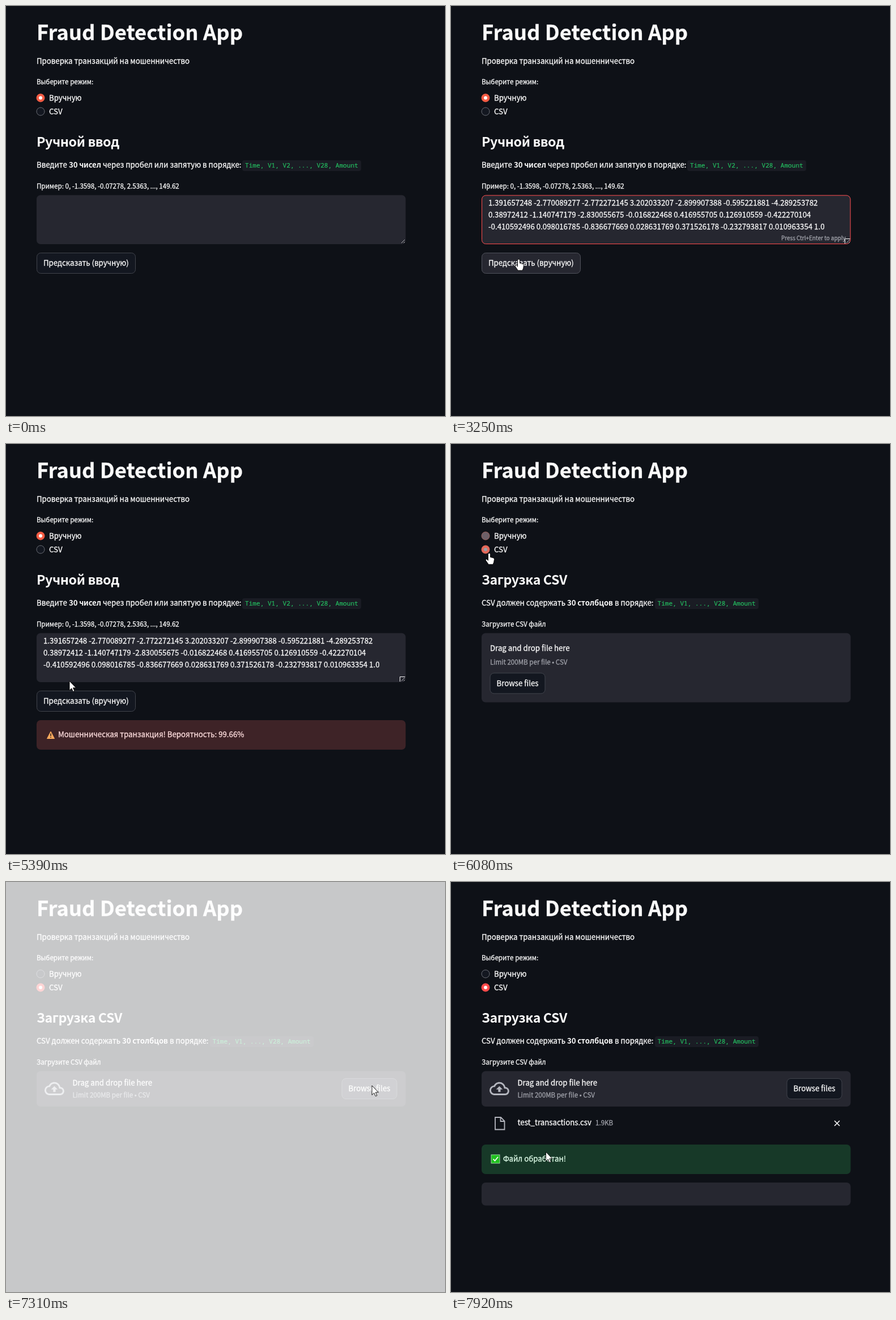
An HTML page for the animation above (7990 ms loop, 775 by 723 pixels).

```html
<!DOCTYPE html>
<html lang="ru">
<head>
<meta charset="utf-8">
<title>Fraud Detection App</title>
<style>
html, body { margin: 0; width: 100%; height: 100%; overflow: hidden; background: #0e1117; }
svg { display: block; width: 775px; height: 723px; }
text { --ink: #fafafa; font: 13.26px "Noto Sans CJK JP", "Noto Sans CJK SC", "Noto Sans CJK", "Open Sans", sans-serif; fill: var(--ink); stroke: var(--ink); stroke-width: .3; white-space: pre; }
.h1 { font-size: 36.45px; font-weight: 700; }
.h3 { font-size: 23.2px; font-weight: 600; letter-spacing: -.017em; stroke: none; }
.small { font-size: 11.6px; }
.tiny { font-size: 9.94px; }
.dim { --ink: #a0a2aa; }
.bold { font-weight: 600; letter-spacing: -.012em; stroke: none; }
.code { --ink: #25c262; font: 11.1px "Noto Sans Mono", "DejaVu Sans Mono", monospace; stroke-width: .15; }
.fraud { --ink: #ffdede; }
.ok { --ink: #dffde9; }
.tag { fill: #1a1c24; }
.box { fill: #262730; }
.btn { fill: #131720; stroke: #41444c; }
.btn.hover { fill: #262730; stroke: #50525b; }
#browse .btn.hover { fill: #383a44; stroke: #5c5e67; }
.line { fill: none; stroke: #fafafa; }
#cursor path { fill: #fff; stroke: #000; stroke-width: .9; }
#cursor #beam { fill: none; stroke: #e8e8e8; stroke-width: 1; }
</style>
</head>
<body>
<svg viewBox="0 0 775 723">
  <rect width="775" height="723" fill="#0e1117"/>
  <text class="h1" x="54" y="60">Fraud Detection App</text>
  <text x="54" y="102">Проверка транзакций на мошенничество</text>
  <text class="small" x="54" y="138">Выберите режим:</text>
  <g id="radio1"><circle cx="61" cy="162" r="7"/><circle cx="61" cy="162" r="3"/></g>
  <g id="radio2"><circle cx="61" cy="186" r="7"/><circle cx="61" cy="186" r="3"/></g>
  <text x="76" y="167">Вручную</text>
  <text x="76" y="191">CSV</text>

  <g id="manual">
    <text class="h3" x="54" y="248">Ручной ввод</text>
    <text y="285"><tspan x="54">Введите</tspan><tspan x="111" class="bold">30 чисел</tspan><tspan x="171">через пробел или запятую в порядке:</tspan></text>
    <rect class="tag" x="417" y="272" width="210" height="19" rx="4"/>
    <text class="code" x="422" y="285">Time, V1, V2, ..., V28, Amount</text>
    <text class="small" x="54" y="322">Пример: 0, -1.3598, -0.07278, 2.5363, ..., 149.62</text>
    <rect class="box" x="54" y="333.5" width="651.5" height="86.5" rx="7"/>
    <rect id="focus" x="54.5" y="334" width="650.5" height="85.5" rx="7" fill="none" stroke="#ff4b4b"/>
    <path class="line" d="M698 418l6-6M702 418l2-2" stroke-opacity=".75" stroke-width=".9"/>
    <path id="caret" class="line" d="M66.5 339v16"/>
    <g id="pasted">
      <text x="66" y="352">1.391657248 -2.770089277 -2.772272145 3.202033207 -2.899907388 -0.595221881 -4.289253782</text>
      <text x="66" y="373">0.38972412 -1.140747179 -2.830055675 -0.016822468 0.416955705 0.126910559 -0.422270104</text>
      <text x="66" y="394">-0.410592496 0.098016785 -0.836677669 0.028631769 0.371526178 -0.232793817 0.010963354 1.0</text>
      <path class="line" d="M695.5 419v-8.5h9"/>
    </g>
    <text id="hint" class="tiny dim" x="583" y="413">Press Ctrl+Enter to apply</text>
    <rect id="predict" class="btn" x="54.5" y="435.5" width="174" height="36" rx="7"/>
    <text x="66" y="458">Предсказать (вручную)</text>
    <g id="alert">
      <rect x="54" y="487" width="651.5" height="52" rx="7" fill="#3e2327"/>
      <path d="M79 507l6.5 12.5h-13z" fill="#f7a85c" stroke="#f7a85c" stroke-linejoin="round"/>
      <path d="M79 510.5v4.5M79 516.5v1.6" stroke="#33251f" stroke-width="1.6"/>
      <text class="fraud" x="92" y="517">Мошенническая транзакция! Вероятность: 99.66%</text>
    </g>
  </g>

  <g id="csv">
    <text class="h3" x="54" y="248">Загрузка CSV</text>
    <text y="285"><tspan x="54">CSV должен содержать</tspan><tspan x="205" class="bold">30 столбцов</tspan><tspan x="289">в порядке:</tspan></text>
    <rect class="tag" x="360" y="272" width="183" height="19" rx="4"/>
    <text class="code" x="364.5" y="285">Time, V1, ..., V28, Amount</text>
    <text class="small" x="54" y="322">Загрузите CSV файл</text>
    <rect id="drop" class="box" x="54" y="333.5" width="651.5" rx="7"/>
    <path id="cloud" transform="translate(68 347) scale(1.45)" fill="#b4b6be" d="M19.35 10.04A7.49 7.49 0 0 0 12 4C9.11 4 6.6 5.64 5.35 8.04A6 6 0 0 0 0 14c0 3.31 2.69 6 6 6h13c2.76 0 5-2.24 5-5 0-2.64-2.05-4.78-4.65-4.96zM19 18H6c-2.21 0-4-1.79-4-4 0-2.05 1.53-3.76 3.56-3.97l1.07-.11.5-.95A5.47 5.47 0 0 1 12 6c2.62 0 4.88 1.86 5.39 4.43l.3 1.5 1.53.11A2.98 2.98 0 0 1 22 15c0 1.65-1.35 3-3 3zM8 13h2.55v3h2.9v-3H16l-4-4z"/>
    <text id="drag">Drag and drop file here</text>
    <text id="limit" class="small dim">Limit 200MB per file • CSV</text>
    <g id="browse">
      <rect class="btn" x=".5" y=".5" width="97" height="36" rx="7"/>
      <text x="12" y="23">Browse files</text>
    </g>
    <g id="file">
      <path class="line" d="M78 415h10l6.5 6.5v15H78zM87.5 415v7h7" stroke-width="1.8" style="stroke:#b4b6be"/>
      <text x="117.5" y="429">test_transactions.csv</text>
      <text class="small dim" x="255" y="429">1.9KB</text>
      <path class="line" d="M677 421l9 9m0-9l-9 9" stroke-width="1.6"/>
    </g>
    <g id="done">
      <rect x="54" y="463" width="651.5" height="52" rx="7" fill="#173928"/>
      <rect x="71" y="481" width="15" height="15" fill="#1fc21f" stroke="#b9e8bd" stroke-width=".8"/>
      <path class="line" d="M74.5 488.5l3 3.2 5.5-7" stroke-width="1.8"/>
      <text class="ok" x="92" y="493">Файл обработан!</text>
      <rect class="box" x="54" y="530" width="651.5" height="40.5" rx="7"/>
    </g>
  </g>

  <rect id="flash" width="775" height="723" fill="#fff"/>
  <g id="cursor">
    <path id="beam" d="M-3-7.5h6M0-7.5v15M-3 7.5h6"/>
    <path id="arrow" d="M0 0v16.5l3.8-3.6 2.6 5.8 2.6-1.1-2.6-5.7h5.1z"/>
    <path id="hand" d="M-2 2a2 2 0 0 1 4 0v5l5 1.2q2 .6 2 2.6l-.8 5-1.5 4h-8l-5-7.3q-.7-1.7 1-2 1.3 0 3.3 2.3z"/>
  </g>
</svg>
<script>
const LOOP = 7990, STEP = 70;
const $ = id => document.getElementById(id);
const show = (id, on) => { $(id).style.display = on ? '' : 'none'; };
const fade = (id, a) => { $(id).style.opacity = a; };
const put = (id, x, y) => $(id).setAttribute('transform', `translate(${x} ${y})`);
const ramp = (t, a, b) => Math.min(1, Math.max(0, (t - a) / (b - a)));
const within = (t, a, b) => t >= a && t < b;

// Pointer moves: start, end, shape, from x, y, to x, y
const moves = [
  [500, 700, 'beam', 85, 359, 115, 369.5],
  [1230, 1230, 'beam', 116, 370],
  [2220, 2360, 'beam', 116, 370, 118, 370],
  [3040, 3110, 'beam', 118, 382, 118, 408],
  [3180, 3180, 'arrow', 119, 428],
  [3250, 3250, 'hand', 119.5, 446.5],
  [5320, 5320, 'hand', 117, 440],
  [5390, 5670, 'arrow', 112, 418, 70, 214],
  [5740, 5740, 'hand', 67.5, 192.5],
  [6290, 6620, 'arrow', 100, 212, 605, 352],
  [6690, 6690, 'hand', 646, 359],
  [7030, 7030, 'arrow', 646, 359],
  [7430, 7430, 'arrow', 165, 294],
  [7710, 7920, 'arrow', 165, 325, 167.5, 476]
];
const flashes = [[7230, .4], [7310, .77], [7360, .95], [7430, .45], [7500, 0]];
const latest = (list, t) => list.filter(m => m[0] <= t).pop();

function pointer(t) {
  const m = latest(moves, t);
  show('cursor', m);
  if (!m) return;
  const [a, b, shape, x0, y0, x1 = x0, y1 = y0] = m;
  const held = a + Math.floor((t - a) / STEP) * STEP;
  const k = t >= b ? 1 : ramp(held, a, b);
  put('cursor', x0 + (x1 - x0) * k, y0 + (y1 - y0) * k);
  for (const s of ['beam', 'arrow', 'hand']) show(s, s === shape);
}

function radio(id, fill, stroke, dot) {
  const [ring, core] = $(id).children;
  ring.setAttribute('fill', fill);
  ring.setAttribute('stroke', stroke);
  core.setAttribute('fill', dot);
}

function radios(t) {
  const off = ['#131720', '#6a6d75', 'none'];
  if (t < 6080) {
    radio('radio1', '#f55c44', '#f55c44', '#fff');
    radio('radio2', ...off);
  } else if (t < 6150) {
    radio('radio1', '#6d6068', '#a0645e', 'none');
    radio('radio2', '#e5695a', '#e5695a', '#94a0aa');
  } else {
    radio('radio1', ...off);
    radio('radio2', '#ff4b4b', '#ff4b4b', '#fff');
  }
}

function uploader(t) {
  const narrow = t < 6150;
  $('drop').setAttribute('height', narrow ? 122 : 62.5);
  show('cloud', !narrow);
  put('drag', ...(narrow ? [69, 365] : [117.5, 359]));
  put('limit', ...(narrow ? [69, 389] : [117.5, 380]));
  put('browse', ...(narrow ? [68.5, 403.5] : [592.5, 346]));
  $('browse').firstElementChild.classList.toggle('hover', within(t, 6690, 7430));
  show('file', t >= 7710);
  show('done', t >= 7850);
}

function draw(t) {
  show('manual', t < 6080);
  show('csv', t >= 6080);
  fade('focus', ramp(t, 1690, 1890) - ramp(t, 3650, 3860));
  fade('caret', ramp(t, 1760, 1890) - ramp(t, 2220, 2360));
  show('pasted', t >= 2690);
  show('hint', within(t, 2690, 3720));
  $('predict').classList.toggle('hover', within(t, 3250, 5390));
  show('alert', t >= 3930);
  fade('alert', t < 4000 ? .5 : 1);
  radios(t);
  uploader(t);
  fade('flash', (latest(flashes, t) || [0, 0])[1]);
  pointer(t);
}

const start = performance.now();
function tick() {
  draw((performance.now() - start) % LOOP);
  requestAnimationFrame(tick);
}
tick();
</script>
</body>
</html>
```
